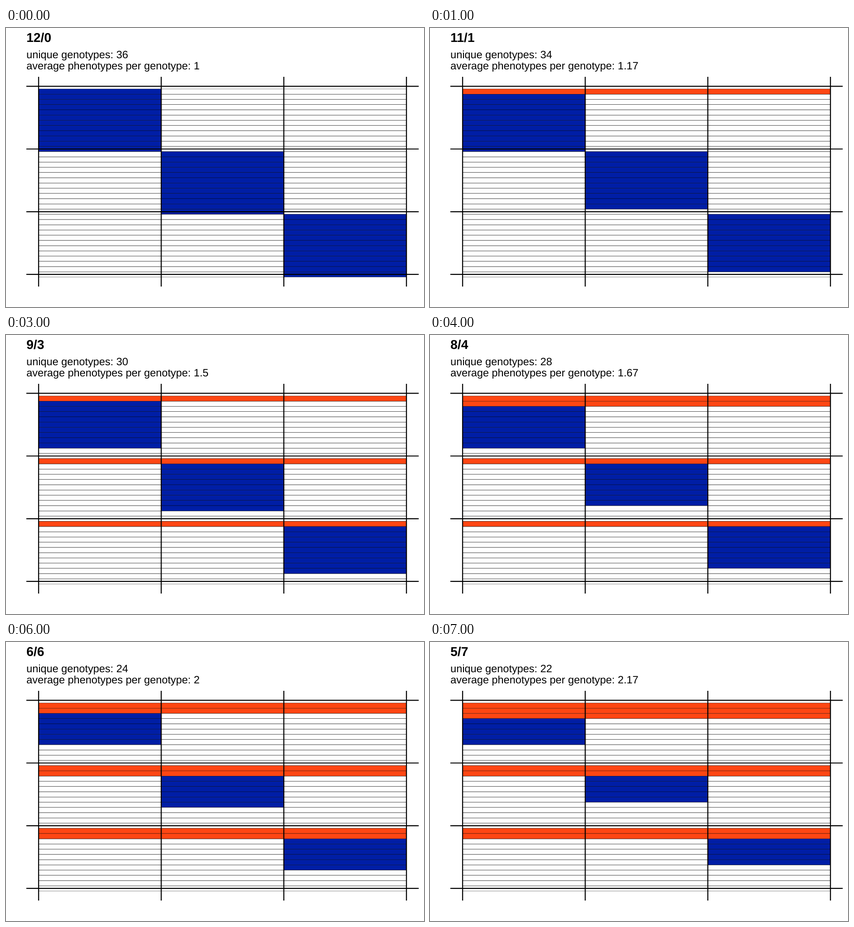
These frames come from a looping animation (900x600 px, 8000 ms). An HTML page:

```html
<!DOCTYPE html>
<html lang="en">
<head>
<meta charset="utf-8">
<style>
  html, body { margin: 0; width: 100%; height: 100%; overflow: hidden; background: #fff; }
  svg { display: block; }
  text { font: 22.9px "Liberation Sans", Arial, sans-serif; text-rendering: geometricPrecision; }
  #title { font-size: 27.5px; font-weight: bold; }
  #tiles { stroke: #000; stroke-width: .45; }
  #grid { stroke: #000; stroke-width: 2.2; }
</style>
</head>
<body>
<svg width="900" height="600">
  <text id="title" x="44" y="30"></text>
  <text id="unique" x="44" y="64.5"></text>
  <text id="average" x="44" y="89.3"></text>
  <g id="tiles"></g>
  <g id="grid"></g>
</svg>
<script>
const LEFT = 70.2, TOP = 125.4, COL = 264, ROW = 11.237, ROWS = 12, BLOCKS = 3;
const BLUE = '#001ea6', ORANGE = '#ff4613';
const STEPS = 8, STEP_MS = 1000;
const byId = id => document.getElementById(id);

function add(parent, tag, attrs) {
  const el = document.createElementNS('http://www.w3.org/2000/svg', tag);
  for (const name in attrs) el.setAttribute(name, attrs[name]);
  return byId(parent).appendChild(el);
}

const tiles = [];
for (let row = 0; row < ROWS * BLOCKS; row++) {
  for (let col = 0; col < BLOCKS; col++) {
    const el = add('tiles', 'rect', {
      x: LEFT + col * COL, y: TOP + (row + .5) * ROW, width: COL, height: ROW
    });
    tiles.push({ el, col, block: Math.floor(row / ROWS), row: row % ROWS });
  }
}

for (let i = 0; i <= BLOCKS; i++) {
  const x = LEFT + i * COL, y = TOP + i * ROWS * ROW;
  add('grid', 'line', { x1: x, x2: x, y1: 105, y2: 556 });
  add('grid', 'line', { x1: 43.8, x2: 888.6, y1: y, y2: y });
}

// Each step turns one specific row per block into a share of general rows.
function show(general) {
  const specific = ROWS - general;
  byId('title').textContent = `${specific}/${general}`;
  byId('unique').textContent = `unique genotypes: ${36 - 2 * general}`;
  byId('average').textContent =
    `average phenotypes per genotype: ${+(1 + general / 6).toFixed(2)}`;
  for (const { el, col, block, row } of tiles) {
    const start = Math.floor((general + 2 - block) / BLOCKS);
    const isBlue = col === block && row < start + specific;
    el.setAttribute('fill', row < start ? ORANGE : isBlue ? BLUE : 'none');
  }
}

let shown = -1;
function tick() {
  const step = Math.floor(performance.now() / STEP_MS) % STEPS;
  if (step !== shown) show(shown = step);
  requestAnimationFrame(tick);
}
tick();
</script>
</body>
</html>
```
